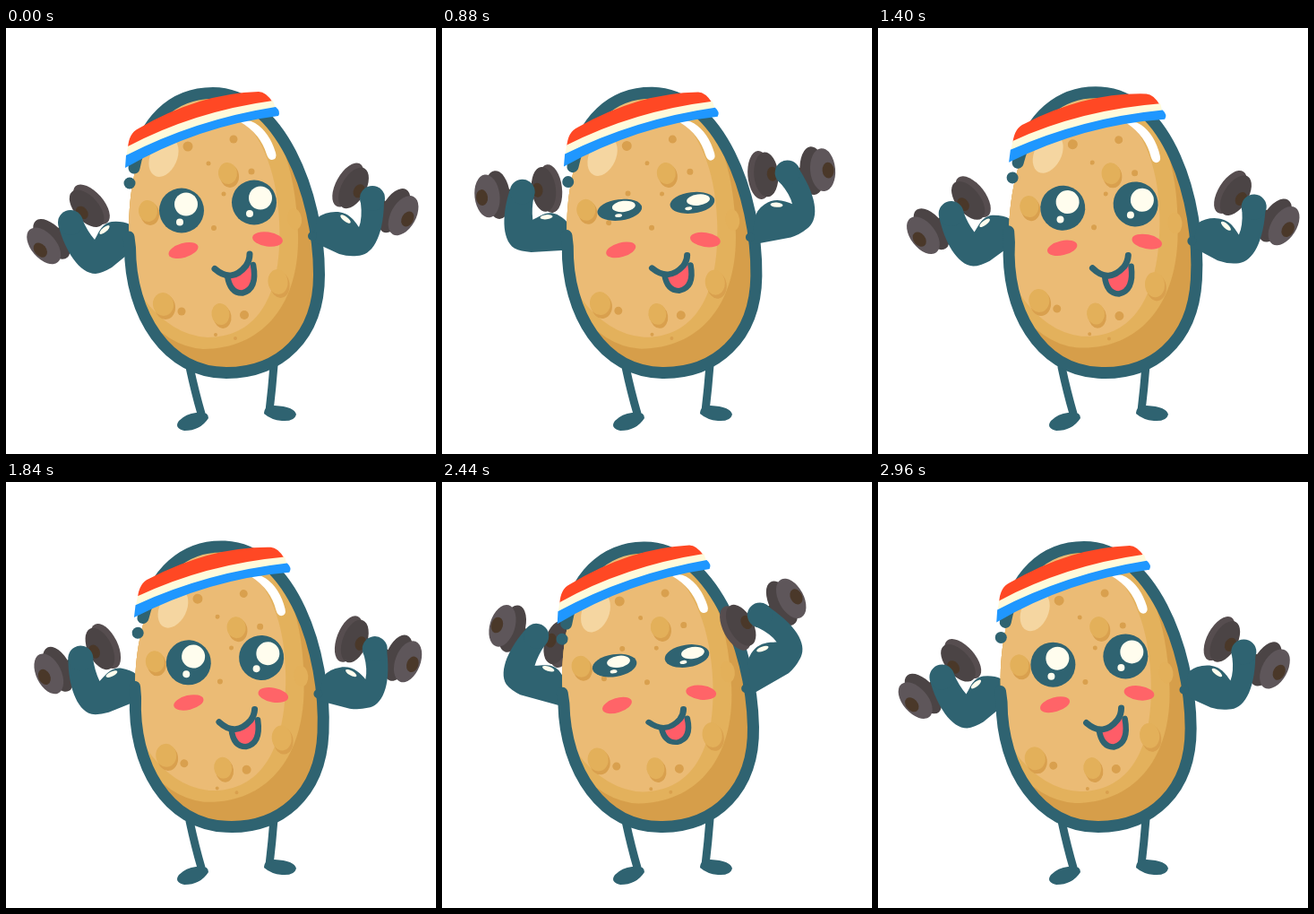
An HTML page with a canvas for the animation above (3000 ms loop, 480 by 475 pixels).

```html
<!DOCTYPE html>
<html lang="en">
<head>
<meta charset="utf-8">
<title>Potato workout</title>
<style>
html, body { margin: 0; width: 100%; height: 100%; overflow: hidden; background: #fff; }
canvas { display: block; width: 480px; height: 475px; }
</style>
</head>
<body>
<canvas id="stage"></canvas>
<script>
const W = 480, H = 475, LOOP = 3000, STEP = 40;
const INK = '#2f6371', CREAM = '#fffdee', DOT = '#d9a04e', BUMP = '#e3b05a';
const canvas = document.getElementById('stage');
const ctx = canvas.getContext('2d');
const dpr = window.devicePixelRatio || 1;
canvas.width = W * dpr;
canvas.height = H * dpr;

const rad = deg => deg * Math.PI / 180;

// Keys are [ms, value]; angles in degrees.
const tiltKeys = [[0, 0], [320, 1.05], [600, 0.9], [880, 0.75], [1120, 1.6], [1400, 3.3],
  [1680, 3.1], [2160, 0.45], [2440, -1.1], [2740, -1.75], [2960, -0.2]];
const leftKeys = [[0, 0], [90, -2], [320, 33], [600, 61], [880, 33.5], [1120, 1], [1400, 0],
  [1680, -2], [2160, 59], [2300, 62], [2440, 59], [2800, 1], [2960, 0]];
const rightKeys = [[0, 0], [90, -2], [320, 24], [610, 57], [880, 34.5], [1120, 1], [1400, 0],
  [1680, -2], [2160, 53], [2320, 58], [2440, 56], [2800, 1], [2960, 0]];
const eyeKeys = [[0, 1], [640, 1], [810, 0.47], [940, 0.47], [1110, 1], [2200, 1],
  [2370, 0.5], [2500, 0.5], [2670, 1]];

// Looping cubic interpolation; slopes are flat at peaks and holds.
function sample(keys, t) {
  const n = keys.length;
  const key = i => {
    const turn = Math.floor(i / n), k = keys[i - turn * n];
    return [k[0] + turn * LOOP, k[1]];
  };
  let i = n - 1;
  while (keys[i][0] > t) i--;
  const grade = j => (key(j + 1)[1] - key(j)[1]) / (key(j + 1)[0] - key(j)[0]);
  const slope = j => {
    const a = grade(j - 1), b = grade(j);
    return a * b <= 0 ? 0 : 2 * a * b / (a + b);
  };
  const [t0, v0] = key(i), [t1, v1] = key(i + 1);
  const d = t1 - t0, u = (t - t0) / d, w = 1 - u;
  return v0 * (1 + 2 * u) * w * w + slope(i) * d * u * w * w
    + v1 * u * u * (3 - 2 * u) - slope(i + 1) * d * u * u * w;
}

function oval(x, y, rx, ry, color, deg = 0) {
  ctx.fillStyle = color;
  ctx.beginPath();
  ctx.ellipse(x, y, rx, ry, rad(deg), 0, 7);
  ctx.fill();
}
const disc = (x, y, r, color) => oval(x, y, r, r, color);

function shape(d, color) {
  ctx.fillStyle = color;
  ctx.fill(new Path2D(d));
}

function line(d, width, color = INK) {
  ctx.strokeStyle = color;
  ctx.lineWidth = width;
  ctx.lineCap = ctx.lineJoin = 'round';
  ctx.stroke(new Path2D(d));
}

function turnAbout(x, y, deg) {
  ctx.translate(x, y);
  ctx.rotate(rad(deg));
  ctx.translate(-x, -y);
}

function legs() {
  line('M205 378 Q211 406 218 430', 9);
  shape('M212 429 Q226 427 226 435 Q217 449 199 449 Q187 446 193 438 Q201 430 212 429Z', INK);
  line('M299 376 Q297 402 294 427', 9);
  shape('M288 430 Q288 421 300 421 Q322 422 324 431 Q322 439 308 438 Q296 437 288 430Z', INK);
}

// The bar lies on x, with the outer weight at negative x.
function dumbbell(x, y, deg, mirror) {
  ctx.save();
  ctx.translate(x, y);
  ctx.rotate(rad(deg));
  if (mirror) ctx.scale(-1, 1);
  oval(31, 0, 13.5, 27, '#564d4f');
  oval(24, 0, 13.5, 25, '#4b4445');
  oval(17, 0, 6, 8, '#4a3829');
  line('M-24 0 H17', 9, '#4a3829');
  oval(-28, 0, 14, 27, '#4b4445');
  oval(-39.5, 0, 14, 24, '#5e565a');
  oval(-45.5, 1, 6.5, 9, '#4a3829');
  ctx.restore();
}

function leftArm(deg) {
  ctx.save();
  ctx.save();
  turnAbout(133, 226, deg);
  dumbbell(72, 217, -41, false);
  ctx.restore();
  ctx.fillStyle = INK;
  ctx.beginPath();
  ctx.moveTo(146, 220);
  ctx.lineTo(138, 219);
  turnAbout(133, 226, deg);
  ctx.quadraticCurveTo(130, 215, 118, 216);
  ctx.bezierCurveTo(106, 218, 103, 230, 99, 236);
  ctx.quadraticCurveTo(91, 227, 85, 213);
  ctx.lineTo(59, 222);
  ctx.bezierCurveTo(66, 248, 82, 274, 100, 274);
  ctx.quadraticCurveTo(108, 273, 118, 267);
  turnAbout(133, 226, -deg);
  ctx.lineTo(140, 249);
  ctx.closePath();
  ctx.fill();
  turnAbout(133, 226, deg);
  disc(72, 217, 14, INK);
  oval(110, 225, 7, 2.6, CREAM, -40);
  ctx.restore();
}

function rightArm(deg) {
  ctx.save();
  ctx.save();
  turnAbout(347, 217, -deg);
  dumbbell(409, 190, 29, true);
  ctx.restore();
  ctx.fillStyle = INK;
  ctx.beginPath();
  ctx.moveTo(343, 238);
  ctx.lineTo(347, 212);
  turnAbout(347, 217, -deg);
  ctx.quadraticCurveTo(356, 205, 368, 205);
  ctx.bezierCurveTo(383, 205, 389, 215, 394, 222);
  ctx.quadraticCurveTo(398, 212, 396, 195);
  ctx.lineTo(422, 195);
  ctx.bezierCurveTo(421, 235, 408, 254, 392, 254);
  ctx.quadraticCurveTo(382, 255, 372, 252);
  turnAbout(347, 217, deg);
  ctx.lineTo(346, 240);
  ctx.closePath();
  ctx.fill();
  disc(342, 232, 5, INK);
  turnAbout(347, 217, -deg);
  disc(409, 190, 14, INK);
  oval(379, 213, 7, 2.6, CREAM, 38);
  ctx.restore();
}

function bump(x, y, rx, ry) {
  oval(x + 1.5, y + 2, rx, ry, DOT, -8);
  oval(x - 0.5, y - 1, rx, ry - 1, BUMP, -8);
}

const around = 'C138.5 320 180 384.5 246 384.5 C305 384.5 349.5 345 349.5 275 C349.5 185 305 72.5 231 72.5';
const skin = new Path2D('M138.5 245 ' + around + ' C155 72.5 132 170 138.5 245Z');
const dots = [[203, 132, 5.5], [254, 124, 4.5], [226, 151, 2.5], [243, 185, 2.5], [274, 160, 3.5],
  [232, 223, 3], [196, 316, 4.5], [266, 320, 5], [234, 342, 2], [256, 346, 2], [205, 185, 3], [184, 218, 3]];

function body() {
  ctx.save();
  ctx.clip(skin);
  ctx.fillStyle = '#d69e4a';
  ctx.fillRect(120, 60, 240, 335);
  shape('M130 60 L262 80 Q322 110 326 230 C328 310 285 358 220 358 Q180 355 150 315 L130 300Z', '#e3b15c');
  shape('M130 60 L250 90 Q300 125 305 215 C309 300 280 345 225 345 Q185 343 152 300 L130 280Z', '#ebbb75');
  oval(176, 144, 15, 23, '#f5d6a1', 24);
  bump(159, 205, 10.5, 13);
  bump(248, 163, 10.5, 13);
  bump(176, 309, 11.5, 14);
  bump(240, 320, 10, 13);
  bump(304, 284, 11, 15);
  oval(322, 213, 8, 12, BUMP, -8);
  for (const [x, y, r] of dots) disc(x, y, r, DOT);
  ctx.restore();

  line('M137 233 L138.5 245 ' + around + ' C185 72.5 153 105 143 156', 13);
  disc(138, 173, 6.5, INK);
  shape('M262 105 Q270 101 278 106 Q294 116 301 139 Q303 146 297 147 Q293 147 291 141 Q284 118 262 105Z', '#fff');
}

function headband() {
  shape('M136 134 Q137 117 148 112 Q215 73 282 71 Q290 71 298 83 Q215 93 136 134Z', '#ff4824');
  shape('M136 132 Q210 93 298 81 L301 90 Q212 103 134 145Z', '#fffadb');
  shape('M134 142 Q212 102 301 88 Q307 93 304 98 Q215 109 133 156Z', '#1f97ff');
}

function eye(x, y, open, glintX, glintY, sparkX, sparkY) {
  ctx.save();
  ctx.translate(x, y);
  ctx.rotate(rad(-8 * (1 - open) / 0.53));
  ctx.scale(1, open);
  disc(0, 0, 25, INK);
  disc(glintX, glintY, 13, CREAM);
  disc(sparkX, sparkY, 4, CREAM);
  ctx.restore();
}

function face(open, lift) {
  eye(196, 203.5, open, 5, -7, -2, 13);
  eye(277, 194.5, open, 7, -5, -5, 12.5);
  oval(198, 248, 17, 8, '#ff6468', -16);
  oval(292, 235.5, 17, 8, '#ff6468', 8);
  ctx.save();
  ctx.translate(0, 262);
  ctx.scale(1, 1 - 0.15 * lift / 60);
  ctx.translate(0, -262);
  const jaw = 'M247 276 Q250 296 264 295.5 Q281 291 276 264';
  shape(jaw + ' L270 263 Q261 276 247 276Z', '#ff5d68');
  line(jaw, 6.5);
  line('M233 268.5 Q252 285 268 265 Q272 259 272 252', 7);
  ctx.restore();
}

function draw(t) {
  const left = sample(leftKeys, t), right = sample(rightKeys, t);
  ctx.setTransform(dpr, 0, 0, dpr, 0, 0);
  ctx.fillStyle = '#fff';
  ctx.fillRect(0, 0, W, H);
  legs();
  turnAbout(249, 380, sample(tiltKeys, t));
  leftArm(left);
  body();
  headband();
  face(sample(eyeKeys, t), left);
  rightArm(right);
}

const start = performance.now();
function tick() {
  const t = (performance.now() - start) % LOOP;
  draw(Math.floor(t / STEP) * STEP);
  requestAnimationFrame(tick);
}
tick();
</script>
</body>
</html>
```
